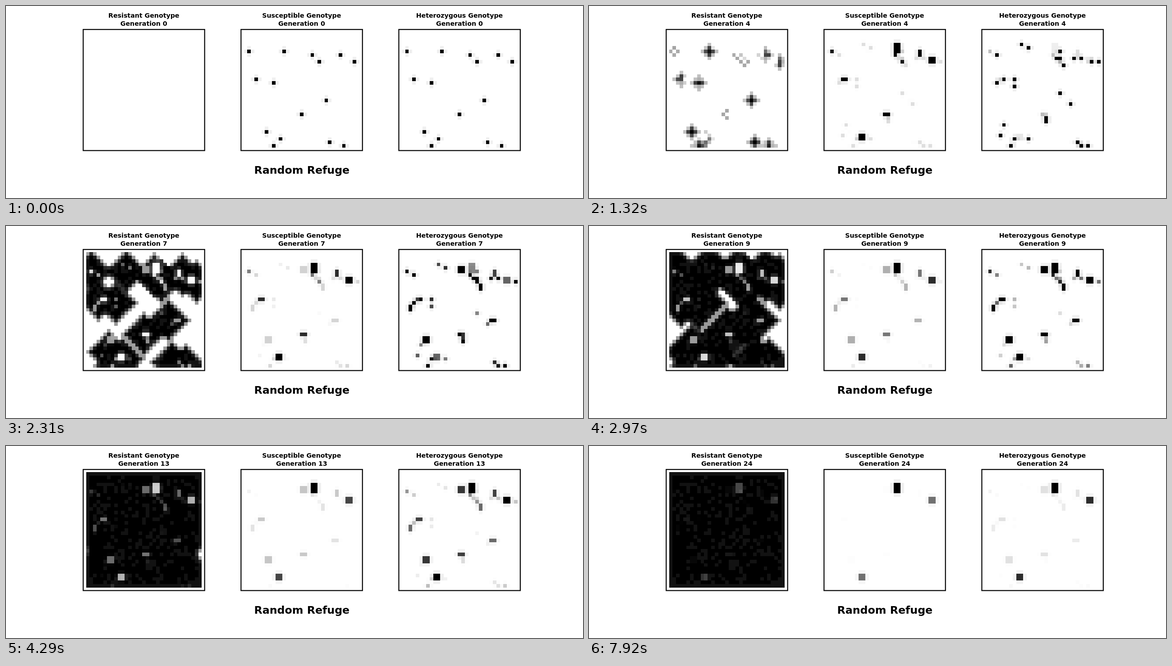
An HTML page with a canvas that plays this animation: 1280x427 px, repeating every 8000 ms.

```html
<!DOCTYPE html>
<html>
<head>
<meta charset="utf-8">
<style>
  html, body { margin: 0; width: 100%; height: 100%; overflow: hidden; background: #fff; }
  canvas { display: block; }
</style>
</head>
<body>
<canvas id="stage" width="1280" height="427"></canvas>
<script>
const ctx = document.getElementById('stage').getContext('2d');
const STEP = 330, LOOP = 8000, GENERATIONS = 25;
const N = 35, CELL = 7.78;   // 33 x 33 habitat with an empty rim
const TITLES = ['Resistant', 'Susceptible', 'Heterozygous'];

// Cells occupied at the start; the sheltered ones lie inside a refuge.
const OPEN = [[12, 6], [24, 20], [29, 33], [25, 32], [7, 29], [9, 15], [4, 14], [28, 7],
  [32, 9], [9, 33], [11, 31]];
const SHELTERED = [[2, 6], [20, 7], [22, 9], [17, 24]];
const FOUNDERS = [...OPEN, ...SHELTERED];

// Larger refuges as x, y, width, height: settled early, or late by mixed offspring.
const EARLY = [[20, 4, 2, 3], [30, 8, 2, 2], [10, 30, 2, 2], [27, 6, 1, 2], [17, 24, 2, 1], [5, 14, 2, 1]];
const LATE = [[17, 5, 2, 2], [23, 10, 1, 2], [26, 20, 2, 1], [3, 16, 1, 2], [7, 25, 2, 2]];

const clamp = v => Math.max(0, Math.min(1, v));
const index = (x, y) => y * N + x;
const grid = () => new Float32Array(N * N);
const inside = (x, y) => x > 0 && y > 0 && x < N - 1 && y < N - 1;
const around = (g, i) => g[i - 1] + g[i + 1] + g[i - N] + g[i + N];

function mapCells(fn) {
  const out = grid();
  for (let y = 1; y < N - 1; y++)
    for (let x = 1; x < N - 1; x++) out[index(x, y)] = fn(index(x, y), x, y);
  return out;
}

function seededRandom(seed) {
  return () => (seed = (seed * 16807) % 2147483647) / 2147483647;
}

const random = seededRandom(4711);
const fitness = mapCells((i, x, y) =>
  random() < 0.22 || !inside(x - 1, y - 1) || !inside(x + 1, y + 1) ? 0.93 : 1);

// A colony is a refuge cell with its log-odds of the susceptible allele at generation 9.
const colonies = [];
function addPatch([x, y, w, h], odds, birth, cap) {
  for (let k = 0; k < w * h; k++)
    colonies.push({ i: index(x + k % w, y + Math.floor(k / w)), odds, birth, cap });
}
for (const p of EARLY) addPatch(p, 0.2 * p[2] * p[3] - 0.5, 1, 9);
for (const p of LATE) addPatch(p, 0.2 * p[2] * p[3] - 0.9, 5, -0.6);
for (const [x, y] of SHELTERED) addPatch([x, y, 1, 1], -0.9, 1, 9);
for (const [x, y] of [...FOUNDERS, ...FOUNDERS]) {
  const cx = x + Math.round(random() * 4 - 2), cy = y + Math.round(random() * 4 - 2);
  if (inside(cx, cy)) addPatch([cx, cy, 1, 1], -1.4 - 2 * random(), 3, -0.6);
}

function alleleShare({ odds, cap }, gen) {
  const rate = gen < 9 ? 0.72 : odds > 0 ? 0.165 : 0.28;
  return 1 / (1 + Math.exp(-Math.min(cap, odds - rate * (gen - 9))));
}

// Resistance spreads from each founder as a growing diamond with a soft rim.
function spread(gen, x, y) {
  let sum = 0;
  FOUNDERS.forEach(([fx, fy], k) => {
    const lag = k < OPEN.length ? 0 : 0.6;
    const reach = Math.min(gen - 0.2, 2.5 - lag + (1.6 + lag / 2) * (gen - 4));
    sum += clamp((reach - Math.abs(x - fx) - Math.abs(y - fy)) / 2);
  });
  return clamp(sum);
}

function normalise(g) {
  const top = Math.max(...g);
  return mapCells(i => clamp((g[i] + 0.06 * around(g, i)) / top));
}

function genotypes(gen) {
  const ss = grid(), rs = grid(), share = grid();
  for (const [x, y] of FOUNDERS)
    ss[index(x, y)] = rs[index(x, y)] = 0.5 * Math.exp(-1.1 * gen);
  for (const colony of colonies) {
    const q = alleleShare(colony, gen), { i, birth } = colony;
    const density = clamp((gen - birth + 1) / 2);
    ss[i] = Math.max(ss[i], density * q * q);
    rs[i] = Math.max(rs[i], density * 2 * q * (1 - q));
    share[i] = Math.max(share[i], density * q);
  }
  const rr = mapCells((i, x, y) =>
    spread(gen, x, y) * fitness[i] * (1 - share[i]) ** 2 * clamp(1 - 0.25 * around(ss, i)));
  if (gen === 0) return [rr, normalise(rs), normalise(rs)];
  return [rr, normalise(ss), normalise(rs)];
}

const history = Array.from({ length: GENERATIONS }, (_, gen) => genotypes(gen));

function label(text, x, y, size) {
  ctx.font = `bold ${size}px "DejaVu Sans", sans-serif`;
  ctx.fillText(text, x, y);
}

function drawPanel(values, title, gen, cx) {
  const left = i => Math.round(cx + (i - 17.5) * CELL);
  const top = i => Math.round(186.6 + (i - 17.5) * CELL);
  mapCells((i, x, y) => {
    const shade = Math.round(255 * (1 - values[i]));
    if (shade > 253) return;
    ctx.fillStyle = `rgb(${shade},${shade},${shade})`;
    ctx.fillRect(left(x), top(y), left(x + 1) - left(x), top(y + 1) - top(y));
  });
  ctx.fillStyle = '#000';
  ctx.strokeRect(cx - 134.7, 52.2, 269.4, 269.3);
  label(title + ' Genotype', cx - 0.2, 26, 14.2);
  label('Generation ' + gen, cx - 0.2, 44.1, 14.2);
}

function draw(now) {
  const gen = Math.floor((now % LOOP) / STEP);
  ctx.fillStyle = '#fff';
  ctx.fillRect(0, 0, 1280, 427);
  ctx.lineWidth = 2.2;
  ctx.textAlign = 'center';
  TITLES.forEach((title, p) => drawPanel(history[gen][p], title, gen, 305.95 + 350.1 * p));
  label('Random Refuge', 656.3, 373.3, 23.7);
  requestAnimationFrame(draw);
}
requestAnimationFrame(draw);
</script>
</body>
</html>
```
